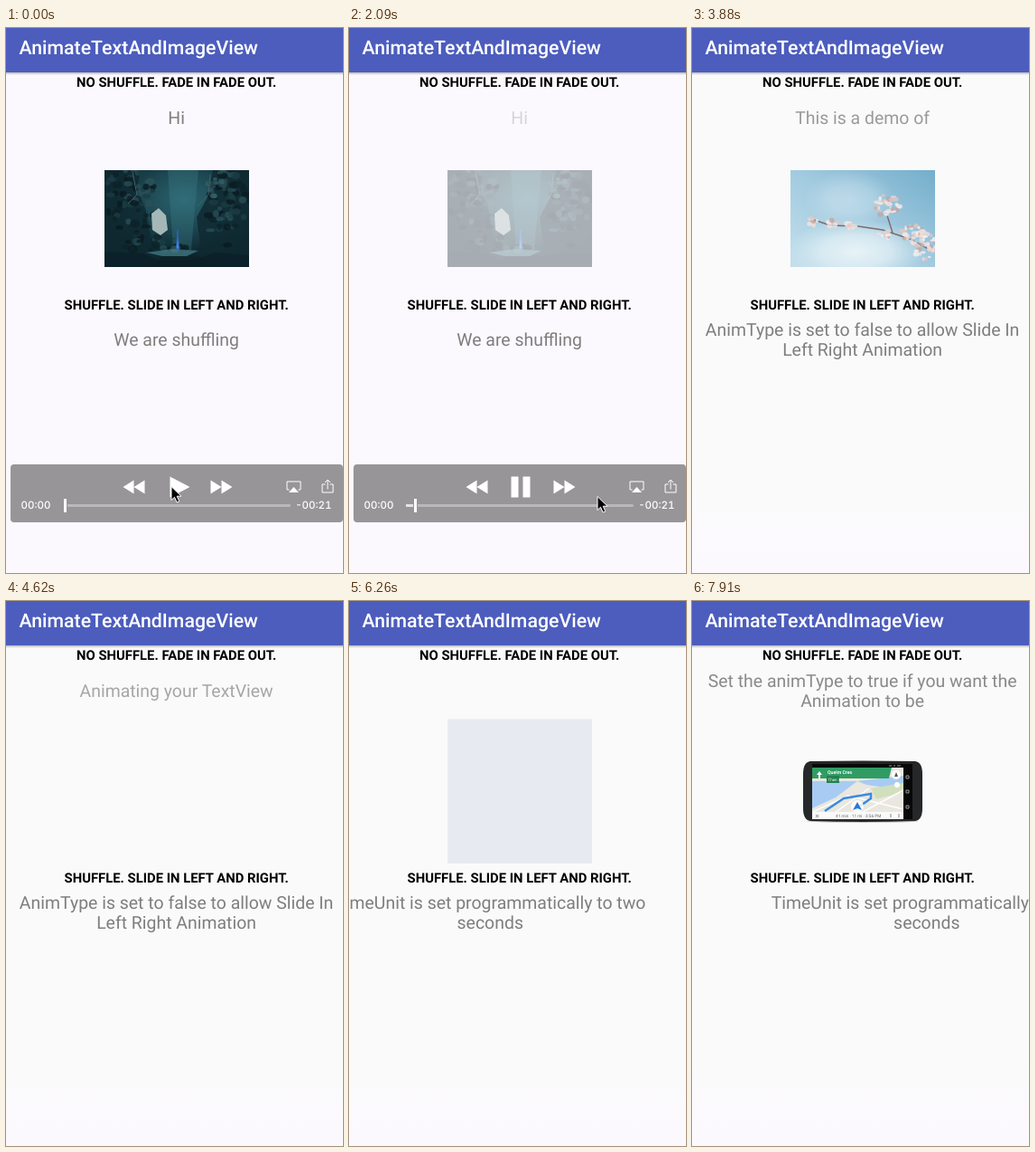
Write an HTML page that moves like this. It is 373 px wide and 602 px high and loops after 8 s.

```html
<!DOCTYPE html>
<html lang="en">
<head>
<meta charset="utf-8">
<style>
html, body { margin: 0; width: 100%; height: 100%; overflow: hidden; background: #fafafa }
svg { display: block; width: 373px; height: 602px; font-family: Roboto, sans-serif; text-rendering: geometricPrecision }
.body { font-size: 19.45px; fill: #7e7e7e; text-anchor: middle }
.head { font-size: 14.83px; font-weight: 700; text-anchor: middle }
.time { font: 500 11.5px Inter, sans-serif; font-variant-numeric: tabular-nums; fill: #fff }
</style>
</head>
<body>
<svg viewBox="0 0 373 602">
  <defs>
    <linearGradient id="page" x2="0" y2="1">
      <stop offset=".85" stop-color="#fafafa"/><stop offset=".98" stop-color="#fcf9fe"/>
    </linearGradient>
    <linearGradient id="shade" x2="0" y2="1">
      <stop stop-color="#999" stop-opacity=".7"/><stop offset="1" stop-color="#999" stop-opacity="0"/>
    </linearGradient>
    <radialGradient id="glow" cx=".55" cy=".3" r=".6">
      <stop stop-color="#2b6470"/><stop offset=".5" stop-color="#1c4650"/><stop offset="1" stop-color="#0c2229"/>
    </radialGradient>
    <linearGradient id="sky" x1="1" x2="0" y2="1">
      <stop stop-color="#74aecb"/><stop offset=".5" stop-color="#a3cbe0"/><stop offset="1" stop-color="#c3dfec"/>
    </linearGradient>
    <radialGradient id="cloud">
      <stop stop-color="#e8f3f7"/><stop offset=".5" stop-color="#dfeef4" stop-opacity=".8"/>
      <stop offset="1" stop-color="#d5e8f0" stop-opacity="0"/>
    </radialGradient>
    <clipPath id="frame"><path d="M0 0h160v107H0z"/></clipPath>
    <clipPath id="screen"><path d="M10 3h101v61H10z"/></clipPath>
  </defs>

  <rect width="373" height="602" fill="url(#page)"/>
  <rect id="tint" width="373" height="602" fill="#fbf9fd"/>
  <rect y="49" width="373" height="3" fill="url(#shade)"/>
  <rect width="373" height="49" fill="#4c5dbd"/>
  <text x="14.500" y="28.500" font-size="21.3" font-weight="500" fill="#fff">AnimateTextAndImageView</text>
  <text class="head" x="188.700" y="65.300">NO SHUFFLE. FADE IN FADE OUT.</text>
  <text class="head" x="188.700" y="310.500">SHUFFLE. SLIDE IN LEFT AND RIGHT.</text>
  <g id="fades" class="body"></g>
  <g id="slides" class="body"></g>

  <g id="images">
    <g transform="translate(109 157)" clip-path="url(#frame)">
      <path d="M0 0h160v107H0z" fill="url(#glow)"/>
      <path d="M70 0h34l-8 88H76z" fill="#3c7c86" opacity=".35"/>
      <path d="M0 0h40l-4 20 10 25 6 35 18 10-20 17H0zM160 0h-40l-6 30-12 22 4 30-8 10 30 15h32z" fill="#102a32" opacity=".85"/>
      <g id="rocks"></g>
      <path d="M117 5l-2 22-12 13M31 2l5 25-10 10" fill="none" stroke="#3d626b"/>
      <path d="M52 48l8-6 8 8 2 16-8 6-9-6z" fill="#a5b7b6"/>
      <path d="M46 91l30-4 28 2-13 6H64z" fill="#4a8792" opacity=".65"/>
      <path d="M0 90l42 2 20 8 38-1 22-8 38 3v13H0z" fill="#0b1f26" opacity=".8"/>
      <path d="M81 66l1.500 21h-3z" fill="#4993ea" stroke="#2563b5"/>
    </g>
    <g id="blossom" transform="translate(109 157)" clip-path="url(#frame)">
      <path d="M0 0h160v107H0z" fill="url(#sky)"/>
      <ellipse cx="72" cy="90" rx="78" ry="36" fill="url(#cloud)"/>
      <ellipse cx="66" cy="32" rx="50" ry="32" fill="url(#cloud)" opacity=".4"/>
      <path d="M20 53l24 8 31 1 27 4 30 10 30 16M113 69l-7-22" fill="none" stroke="#7d6b6c" stroke-width="1.400"/>
    </g>
    <rect x="109" y="130.500" width="160" height="159.500" fill="#4765a0"/>
    <g transform="translate(123 177)">
      <ellipse cx="66" cy="66" rx="62" ry="2" fill="#aaa" opacity=".6"/>
      <path d="M8 0Q66-1 124 0q8 1 8 14v38q0 13-8 14-58 2-116 0-8-1-8-14V14Q0 1 8 0z" fill="#252627"/>
      <path d="M10 3h111v61H10z" fill="#070707"/>
      <g clip-path="url(#screen)">
        <path d="M10 7h101v57H10z" fill="#e9e7df"/>
        <path d="M10 22h50l-24 18-26 12zM60 22l51-6v16L70 26z" fill="#a8cbf3"/>
        <path d="M75 30l36-6v10l-30 8z" fill="#d2dfbd"/>
        <path d="M10 56l40-18 61 15M35 57l38-27M66 56l45-24" fill="none" stroke="#fff" stroke-width="1.5"/>
        <path d="M24 55l21-14 30-5v5l-17 12" fill="none" stroke="#3b8be0" stroke-width="2.5"/>
        <path d="M10 7h88l-3 12H10z" fill="#2f9c62"/>
        <path d="M26 16h14v8H26z" fill="#22804e"/>
        <path d="M18 11l3 4h-2v4h-2v-4h-2z" fill="#fff"/>
        <circle cx="103" cy="15" r="5" fill="#fff"/><path d="M103 12l2 5h-4z" fill="#555"/>
        <circle cx="104" cy="26" r="3" fill="#fff"/>
        <circle cx="60" cy="50" r="7" fill="#fff" opacity=".85"/><path d="M60 45l5 9-5-2-5 2z" fill="#2878da"/>
        <path d="M10 56h101v8H10z" fill="#fafafa"/>
        <path d="M14 59l3 3m0-3l-3 3" stroke="#777"/>
        <text x="27" y="14" font-size="5.2" font-weight="700" fill="#fff">Quelm Cres</text>
        <text x="27.500" y="22" font-size="4.5" fill="#fff">Then ↱</text>
        <text x="36" y="62" font-size="4.7" fill="#666">41 min · 11 mi · 3:56 PM</text>
        <path d="M97 58v4M106 58v4" stroke="#888"/>
      </g>
      <path d="M95 5h3m2 0h2m2 0h4M114 16h3v3h-3zM114 32h3v3h-3zM114 49h3v3h-3z" fill="none" stroke="#bbb" stroke-width=".8"/>
    </g>
  </g>

  <g id="player">
    <rect x="5" y="482" width="368" height="64" rx="4" fill="#989598"/>
    <g transform="translate(.5 .5)" fill="#fff">
      <path d="M129 506.500l12-7.500v15zM141 506.500l12-7.500v15zM226 499l12 7.500-12 7.500zM238 499l12 7.500-12 7.500z"/>
      <path id="play" d="M181 495l22 11.500-22 11.500z"/>
      <path id="pause" d="M179 495h8v23h-8zM192 495h8v23h-8z"/>
      <path d="M313 509.500h-2.500v-9h15v9H323M353 503.500h-3.500v9h12v-9H358M355.500 509v-10M352.500 501.500l3-3 3 3" fill="none" stroke="#fff"/>
      <path d="M318 506.500l5.500 6h-11z"/>
    </g>
    <text class="time" x="16.500" y="531">00:00</text>
    <text class="time" x="360.500" y="531" text-anchor="end">-00:21</text>
    <rect x="63" y="526" width="252" height="3" rx="1.500" fill="#bab8ba"/>
    <rect id="done" x="63" y="526" height="3" fill="#e4e3e4"/>
    <rect id="knob" y="519" width="5" height="17" fill="#989598"/>
    <rect id="tick" y="520" width="3" height="15" fill="#fff"/>
    <path id="cursor" d="M0 0v15l3.500-3.300 2.600 5.800 2.700-1.200-2.600-5.600H11z" fill="#000" stroke="#fff"/>
  </g>
</svg>
<script>
const $ = id => document.getElementById(id);
const svgNode = (parent, tag, attrs, text = '') => {
  const el = document.createElementNS('http://www.w3.org/2000/svg', tag);
  for (const k in attrs) el.setAttribute(k, attrs[k]);
  el.textContent = text;
  parent.append(el);
  return el;
};

const addLabel = (parent, mid, lines) => {
  const g = svgNode(parent, 'g', {});
  lines.forEach((s, i) =>
    svgNode(g, 'text', { x: 188.6, y: mid + (lines.length > 1 ? i * 22.3 - 11 : 0) }, s));
};
[['Hi'], ['This is a demo of'], ['Animating your TextView'],
 ['Set the animType to true if you want the', 'Animation to be']]
  .forEach(lines => addLabel($('fades'), 106, lines));
[['We are shuffling'],
 ['AnimType is set to false to allow Slide In', 'Left Right Animation'],
 ['TimeUnit is set programmatically to two', 'seconds']]
  .forEach(lines => addLabel($('slides'), 351, lines));

let seed = 7;
const rnd = () => (seed = seed * 16807 % 2147483647) / 2147483647;
// Scatters n dots of about the given size inside an ellipse
function scatter(parent, x, y, rx, ry, n, size, colors) {
  for (let i = 0; i < n; i++) {
    const a = rnd() * 6.28, d = Math.sqrt(rnd());
    svgNode(parent, 'ellipse', {
      cx: x + rx * d * Math.cos(a), cy: y + ry * d * Math.sin(a),
      rx: size * (.6 + rnd() * .8), ry: size * (.5 + rnd() * .6),
      fill: colors[i % colors.length], opacity: .75
    });
  }
}

const leaves = ['#2b5058', '#0c2128', '#1c3d45', '#09191f'];
scatter($('rocks'), 28, 38, 32, 40, 60, 4, leaves);
scatter($('rocks'), 136, 42, 24, 44, 55, 4, leaves);
scatter($('rocks'), 126, 20, 14, 12, 14, 3, ['#35616a', '#24494f']);
scatter($('rocks'), 60, 84, 40, 10, 24, 4, leaves);

// Blossom clusters: centre, spread, flower count
for (const [x, y, rx, ry, n] of [[108, 39, 14, 13, 30], [136, 70, 14, 11, 30], [150, 84, 13, 18, 34],
                                 [66, 62, 7, 4, 9], [25, 56, 6, 5, 8], [46, 59, 6, 4, 6], [104, 72, 8, 5, 8]])
  scatter($('blossom'), x, y, rx, ry, n, 2.6, ['#f5e7e4', '#e3c6bf', '#fbf3ef', '#f3dfd9', '#c9a199']);

// [start of entry, start of exit]
const textTimes = [[-999, 1730], [2400, 3700], [4270, 5640], [6350, 7800]];
const imageTimes = [[-999, 1750], [2400, 3930], [4650, 5810], [6400, 7880]];
const slideTimes = [[-999, 2273], [3032, 5003], [5762, 7733]];

const clamp = p => Math.max(0, Math.min(1, p));
const ease = (t, start, length) => (1 - Math.cos(Math.PI * clamp((t - start) / length))) / 2;

function snap(t) {
  if (t < 1500) return t < 1200 ? 0 : 1200;
  if (t >= 6260) return 6260 + 150 * Math.floor((t - 6260) / 150);
  const base = t - (t - 1500) % 1190;
  return base + Math.max(0, 150 * Math.floor((t - base + 10) / 150) - 10);
}

function fadeAll(group, times, t) {
  times.forEach(([enter, leave], i) =>
    group.children[i].setAttribute('opacity', ease(t, enter, 570) - ease(t, leave, 570)));
}

function draw(t) {
  fadeAll($('fades'), textTimes, t);
  fadeAll($('images'), imageTimes, t);
  slideTimes.forEach(([enter, leave], i) => {
    const x = 373 * (ease(t, enter, 615) + ease(t, leave, 615) - 1);
    $('slides').children[i].setAttribute('transform', `translate(${x})`);
  });

  const playing = t >= 1500;
  const shown = 1 - clamp((t - 2150) / 390);
  const head = 64 + Math.max(0, t - 1440) * .0123;
  const move = ease(t, 1500, 560);
  $('tint').setAttribute('opacity', shown);
  $('player').setAttribute('opacity', shown);
  $('play').setAttribute('opacity', playing ? 0 : t < 1200 ? 1 : .65);
  $('pause').setAttribute('opacity', +playing);
  $('done').setAttribute('width', head - 63);
  $('knob').setAttribute('x', head - 1);
  $('tick').setAttribute('x', head);
  $('cursor').setAttribute('transform', `translate(${183 + 92 * move} ${506.5 + 11 * move})`);
}

const begin = performance.now();
function tick() {
  draw(snap((performance.now() - begin) % 8000));
  requestAnimationFrame(tick);
}
tick();
</script>
</body>
</html>
```
